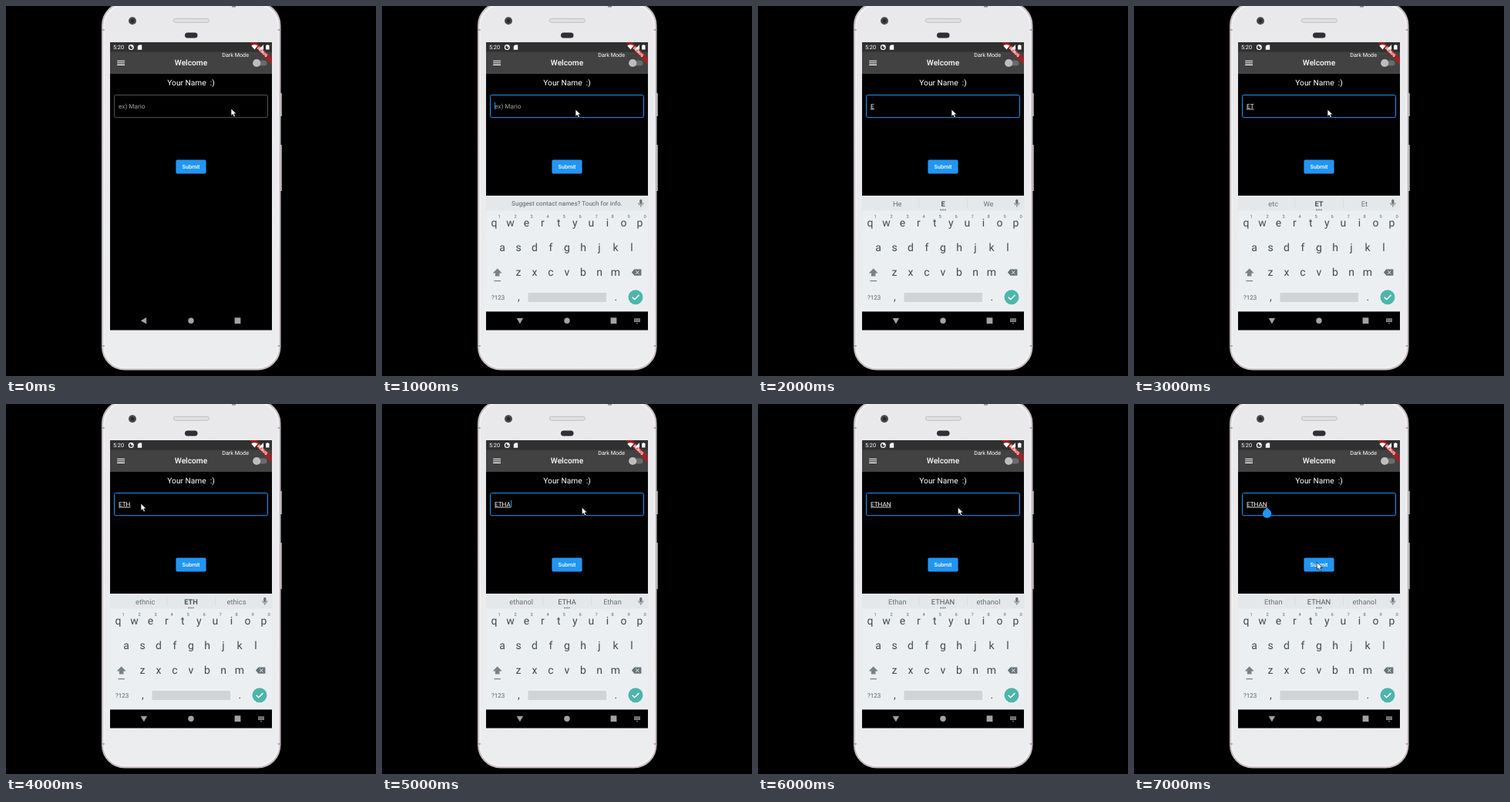
An HTML page that plays this animation: 480x480 px, repeating every 8 s.

```html
<!DOCTYPE html>
<html lang="en">
<head>
<meta charset="utf-8">
<title>Welcome form</title>
<style>
  html, body { margin: 0; width: 100%; height: 100%; overflow: hidden; background: #000; }
  svg { display: block; width: 100%; height: 100%; }
  text { font-family: Roboto, sans-serif; white-space: pre; text-rendering: geometricPrecision; }
  .mid { text-anchor: middle; }
  .key { font-size: 14px; fill: #424b50; text-anchor: middle; }
  .digit { font-size: 5.8px; fill: #5f6a6f; text-anchor: middle; }
  .word { font-size: 9.3px; fill: #68747a; text-anchor: middle; }
  #typed { text-decoration: underline; text-decoration-thickness: .6px; }
</style>
</head>
<body>
<svg viewBox="0 0 480 480">
  <defs>
    <linearGradient id="shell" x2="0" y2="1">
      <stop offset="0" stop-color="#e9e9eb"/>
      <stop offset="1" stop-color="#ecedef"/>
    </linearGradient>
    <clipPath id="screen"><rect x="135" y="47" width="210" height="373.5"/></clipPath>
  </defs>

  <!-- phone -->
  <g>
    <path d="M356 113h1.8v30H356zM356 180h1.8v60H356z" fill="#bdb6b8"/>
    <rect x="125" y="-4" width="230.5" height="475.5" rx="29" fill="#f3f0f1" stroke="#c4bcbe" stroke-width="2"/>
    <rect x="128" y="-1" width="224.5" height="469.5" rx="27" fill="url(#shell)"/>
    <path d="M124.3 31h3.5M352.8 31h3.5M124.3 441h3.5M352.8 441h3.5" stroke="#aaa4a6" stroke-width="2"/>
    <path d="M293 .8h5" stroke="#8f8a8c" stroke-width="1.6"/>
    <rect x="217.3" y="16.3" width="46" height="5" rx="2.5" fill="#e0e0e2" stroke="#bcbcbf" stroke-width=".9"/>
    <rect x="232" y="34.5" width="16.5" height="7" rx="3.5" fill="#303034"/>
    <circle cx="164" cy="19.2" r="5" fill="#4a4b50"/>
    <circle cx="164" cy="19.2" r="2.5" fill="#222a35"/>
  </g>

  <g clip-path="url(#screen)">
    <rect x="135" y="47" width="210" height="374"/>
    <rect x="135" y="47" width="210" height="41" fill="#424242"/>
    <rect x="135" y="47" width="210" height="12.6" fill="#303030"/>

    <!-- app bar -->
    <path d="M144.2 71.2h9.8M144.2 73.8h9.8M144.2 76.4h9.8" stroke="#fff" stroke-width="1.1"/>
    <text class="mid" x="240" y="77.4" font-size="10.2" font-weight="500" fill="#fff">Welcome</text>
    <text class="mid" x="297.6" y="66.3" font-size="7.2" fill="#fff">Dark Mode</text>
    <rect x="321.5" y="70.4" width="17" height="7.2" rx="3.6" fill="#6b6b6b"/>
    <circle cx="325.2" cy="74" r="5.1" fill="#bdbdbd"/>
    <g transform="translate(345 47) rotate(45)">
      <rect x="-20.5" y="14.3" width="41" height="6.2" fill="#b71c1c" opacity=".8"/>
      <text class="mid" y="19.2" font-size="5.1" font-weight="900" fill="#fff">DEBUG</text>
    </g>

    <!-- status bar -->
    <g fill="#fff">
      <text x="139" y="56.2" font-size="7.3">5:20</text>
      <circle cx="162.3" cy="53.6" r="2.9" fill="none" stroke="#fff" stroke-width="1.2"/>
      <path d="M162.3 53.6v-3a3 3 0 0 1 3 3z"/>
      <path d="M172.6 50.4h3.6v6.4h-5.4v-4.6z"/>
      <path d="M318.3 51.6q4.1-2.8 8.2 0l-4.1 5z"/>
      <path d="M334 50.2v6.4h-6.4z"/>
      <path d="M337.2 51h1.2v-.8h1.9v.8h1.2v5.6h-4.3z"/>
    </g>

    <!-- form -->
    <text class="mid" x="240" y="103" font-size="10.2" fill="#fff">Your Name  :)</text>
    <rect id="field" x="140.5" y="115.5" width="199" height="29.2" rx="2" fill="none"/>
    <text id="hint" x="146" y="132.6" font-size="8.2" fill="#a0a0a0">ex) Mario</text>
    <text id="typed" x="146" y="132.6" font-size="8.2" fill="#fff"></text>
    <rect id="caret" y="124.8" width="1" height="9.4" fill="#2196f3"/>
    <path id="handle" d="M172.6 134.2l4 4a5.65 5.65 0 1 1-8 0z" fill="#2196f3"/>
    <rect x="220.4" y="199.5" width="39.2" height="18" rx="2" fill="#2196f3"/>
    <text class="mid" x="240" y="211.1" font-size="7.2" font-weight="500" fill="#fff">Submit</text>

    <!-- keyboard -->
    <g id="keyboard">
      <rect x="135" y="246" width="210" height="150.4" fill="#eceff1"/>
      <rect x="135" y="246" width="210" height="19.5" fill="#e4e8ea"/>
      <text id="notice" class="mid" x="240" y="259.2" font-size="8.15" fill="#566167">Suggest contact names? Touch for info.</text>
      <g id="words">
        <path d="M208.7 250v12M271.5 250v12" stroke="#d2d7da" stroke-width=".7"/>
        <text class="word" x="180.7" y="259.6"></text>
        <text class="word" x="240" y="259.6" style="fill:#48545a"></text>
        <text class="word" x="299" y="259.6"></text>
        <path d="M236.5 264.4h1.6M239.2 264.4h1.6M241.9 264.4h1.6" stroke="#59656b" stroke-width="1.5"/>
      </g>
      <rect x="334.2" y="250.8" width="3.2" height="6.4" rx="1.6" fill="#68747a"/>
      <path d="M332.6 255.2a3.2 3.2 0 0 0 6.4 0M335.8 258.4v2.4" fill="none" stroke="#68747a" stroke-width=".9"/>
      <g id="keys"></g>
      <path d="M149.7 340.6l6 6h-3.2v3.8h-5.6v-3.8h-3.2z" fill="#778388"/>
      <path d="M145.4 356.6h8.6" stroke="#778388" stroke-width="1.3"/>
      <path d="M327.4 341.4h9v8.4h-9l-3.6-4.2z" fill="#68747a"/>
      <path d="M329.2 343.5l4.2 4.2m0-4.2l-4.2 4.2" stroke="#eceff1"/>
      <text class="mid" x="150.6" y="380.6" font-size="8" fill="#566167">?123</text>
      <rect x="189.5" y="372" width="101.5" height="12" rx="1" fill="#d0d4d6"/>
      <circle cx="329" cy="377.7" r="9.5" fill="#4db6ac"/>
      <path d="M324.7 377.8l3 3 5.8-5.9" fill="none" stroke="#fff" stroke-width="1.5"/>
    </g>

    <!-- navigation bar -->
    <g fill="#a3a3a3">
      <path id="back" d="M174.8 408.2l7.4-4.2v8.4z"/>
      <circle cx="240" cy="408.2" r="3.7"/>
      <rect x="296.6" y="404.3" width="7.8" height="7.8"/>
      <g id="switcher">
        <rect x="327" y="405.2" width="8" height="4.9" rx=".6" fill="#8a8a8a"/>
        <path d="M327.9 406.7h6.4M327.9 408.4h6.4" stroke="#111" stroke-width=".7" stroke-dasharray=".8 .6"/>
        <path d="M329.6 410.9h2.8l-1.4 1.4z"/>
      </g>
    </g>
  </g>

  <path id="pointer" d="M0 0v9.4l2.2-2 1.5 3.5 1.8-.8-1.5-3.3h3z" fill="#fff" stroke="#000" stroke-width=".7"/>
</svg>
<script>
  const $ = id => document.getElementById(id);
  const STEP_MS = 1000;

  const steps = [
    { pointer: [292, 133] },
    { pointer: [251, 134], keyboard: true, caret: 146 },
    { pointer: [251, 134], keyboard: true, typed: 'E', words: ['He', 'E', 'We'], bold: true },
    { pointer: [251, 134], keyboard: true, typed: 'ET', words: ['etc', 'ET', 'Et'], bold: true },
    { pointer: [175, 129], keyboard: true, typed: 'ETH', words: ['ethnic', 'ETH', 'ethics'], bold: true },
    { pointer: [259.3, 134], keyboard: true, typed: 'ETHA', words: ['ethanol', 'ETHA', 'Ethan'], caret: 167.3 },
    { pointer: [259.3, 134], keyboard: true, typed: 'ETHAN', words: ['Ethan', 'ETHAN', 'ethanol'] },
    { pointer: [237.3, 205.5], keyboard: true, typed: 'ETHAN', words: ['Ethan', 'ETHAN', 'ethanol'], handle: true }
  ];

  function addKey(className, x, y, label) {
    const key = document.createElementNS('http://www.w3.org/2000/svg', 'text');
    key.setAttribute('class', className);
    key.setAttribute('x', x);
    key.setAttribute('y', y);
    key.textContent = label;
    $('keys').append(key);
  }

  [['qwertyuiop', 145.4, 286.4], ['asdfghjkl', 156, 318.4], ['zxcvbnm', 177, 350.4]]
    .forEach(([letters, left, y]) =>
      [...letters].forEach((letter, i) => addKey('key', left + i * 21, y, letter)));
  [...'1234567890'].forEach((digit, i) => addKey('digit', 152.2 + i * 21, 275, digit));
  addKey('key', 177.3, 381.5, ',');
  addKey('key', 303.3, 381.5, '.');

  const wordLabels = document.querySelectorAll('.word');
  const show = (id, visible) => { $(id).style.display = visible ? '' : 'none'; };

  function render(step) {
    const { pointer, keyboard, typed = '', words, bold, caret, handle } = step;
    show('keyboard', keyboard);
    show('switcher', keyboard);
    show('hint', !typed);
    show('caret', caret);
    show('handle', handle);
    show('words', words);
    show('notice', !words);
    $('typed').textContent = typed;
    $('caret').setAttribute('x', caret || 0);
    $('field').setAttribute('stroke', keyboard ? '#2196f3' : '#8c8c8c');
    $('field').setAttribute('stroke-width', keyboard ? 1 : 0.6);
    $('back').setAttribute('transform', keyboard ? 'rotate(-90 178.9 408.2)' : '');
    $('pointer').setAttribute('transform', `translate(${pointer})`);
    wordLabels.forEach((label, i) => { label.textContent = words ? words[i] : ''; });
    wordLabels[1].style.fontWeight = bold ? 700 : 400;
  }

  const start = performance.now();
  let shown = -1;

  function tick(now) {
    const index = Math.floor(Math.max(0, now - start) / STEP_MS) % steps.length;
    if (index !== shown) render(steps[shown = index]);
    requestAnimationFrame(tick);
  }
  tick(start);
</script>
</body>
</html>
```
